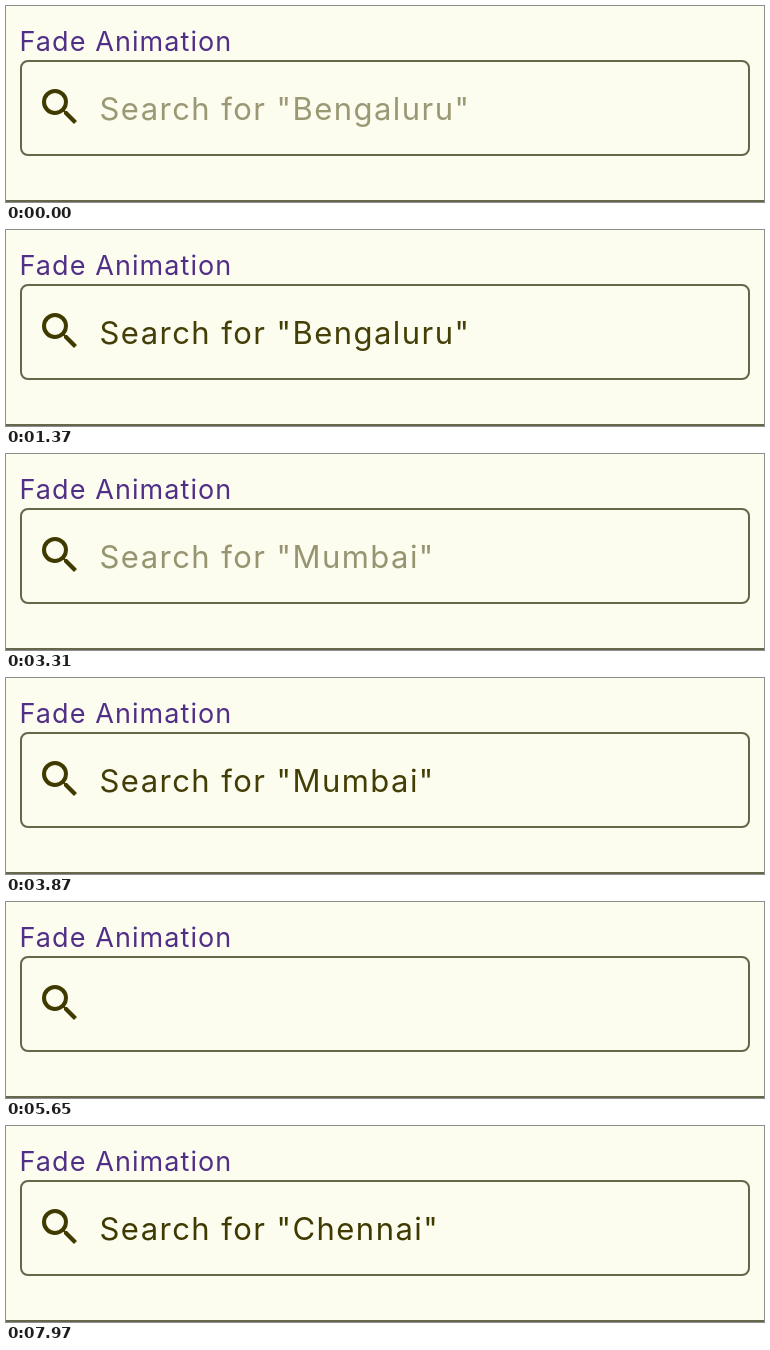
An HTML page with a canvas for the animation above (7990 ms loop, 758x196 px).

```html
<!DOCTYPE html>
<html lang="en">
<head>
<meta charset="utf-8">
<title>Fade Animation</title>
<style>
  html, body { margin: 0; width: 100%; height: 100%; overflow: hidden; background: #fcfcef; }
  canvas { display: block; }
</style>
</head>
<body>
<canvas id="stage" width="758" height="196"></canvas>
<script>
const ctx = document.getElementById('stage').getContext('2d');
const LOOP = 7990;
const INK = '#3e3a00';
const LINE = '#66664a';

// Each hint fades in, holds, fades out, then leaves a short gap.
const FADE_IN = 1250, OUT_START = 2000, OUT_END = 2500;
const hints = [
  { city: 'Bengaluru', start: -640 },
  { city: 'Mumbai', start: 2645 },
  { city: 'Chennai', start: 6020 }
];

const searchIcon = new Path2D(
  'M15.5 14h-.79l-.28-.27A6.47 6.47 0 0 0 16 9.5 6.5 6.5 0 1 0 9.5 16' +
  'c1.61 0 3.09-.59 4.23-1.57l.27.28v.79l5 4.99L20.49 19l-4.99-5z' +
  'M9.5 14a4.5 4.5 0 1 1 0-9 4.5 4.5 0 0 1 0 9z');

const clamp = v => Math.max(0, Math.min(1, v));

function opacity(t) {
  if (t < 0 || t >= OUT_END) return 0;
  return Math.min(clamp(t / FADE_IN), clamp((OUT_END - t) / (OUT_END - OUT_START)));
}

function text(str, x, y, size, spacing, color) {
  ctx.font = `400 ${size}px Inter, Roboto, sans-serif`;
  ctx.letterSpacing = spacing + 'px';
  ctx.fillStyle = color;
  ctx.fillText(str, x, y);
}

function drawField() {
  ctx.fillStyle = '#fcfcef';
  ctx.fillRect(0, 0, 758, 196);
  text('Fade Animation', 13.5, 44.5, 27, 1.08, '#512e87');

  ctx.strokeStyle = LINE;
  ctx.lineWidth = 2;
  ctx.beginPath();
  ctx.roundRect(15, 55, 728, 94, 7);
  ctx.stroke();

  ctx.save();
  ctx.translate(30, 77);
  ctx.scale(2, 2);
  ctx.fillStyle = INK;
  ctx.fill(searchIcon, 'evenodd');
  ctx.restore();

  ctx.fillStyle = LINE;
  ctx.fillRect(0, 194, 758, 2);
}

function draw(now) {
  const t = now % LOOP;
  drawField();
  for (const { city, start } of hints) {
    const alpha = opacity(t - start);
    if (!alpha) continue;
    ctx.globalAlpha = alpha;
    text(`Search for "${city}"`, 93.5, 114, 31, 1.45, INK);
    ctx.globalAlpha = 1;
  }
}

const begin = performance.now();
function tick() {
  draw(performance.now() - begin);
  requestAnimationFrame(tick);
}
tick();
</script>
</body>
</html>
```
